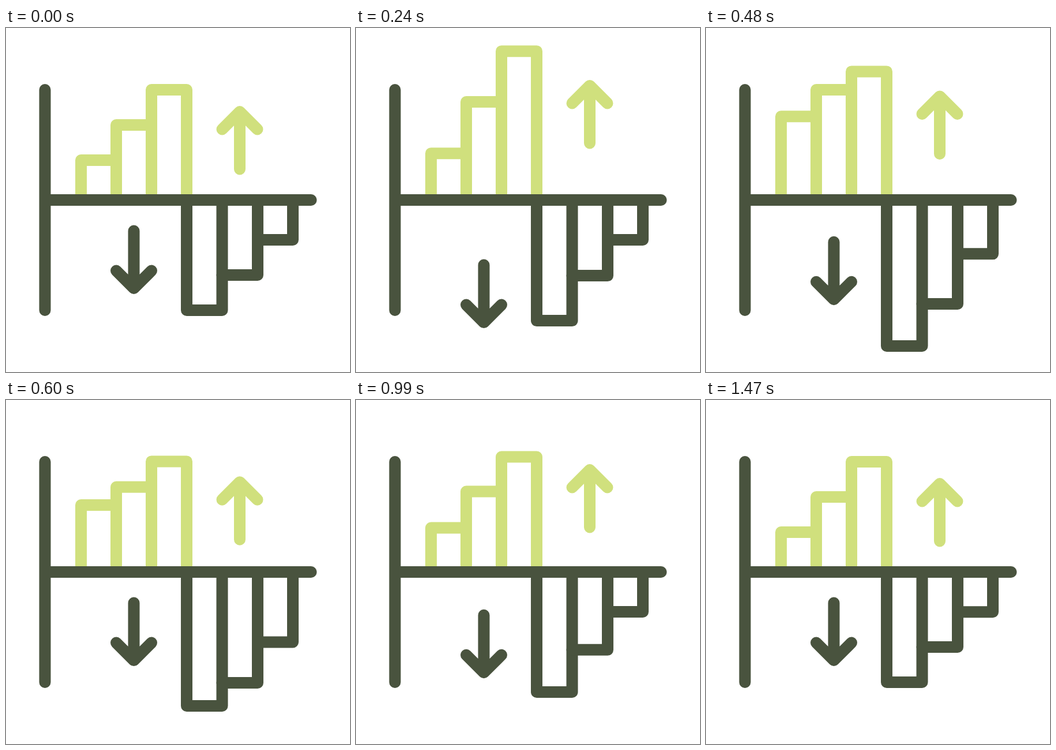
These frames come from a looping animation (596x596 px, 1.5 s). An HTML page:

```html
<!DOCTYPE html>
<html lang="en">
<head>
<meta charset="utf-8">
<title>Rising and falling bars</title>
<style>
  html, body { margin: 0; width: 100%; height: 100%; overflow: hidden; background: #fff; }
  svg { display: block; width: 100%; height: 100%; }
  path { fill: none; stroke-width: 20; stroke-linecap: round; stroke-linejoin: round; }
  .up { stroke: #d0e07d; }
  .down { stroke: #49533e; }
</style>
</head>
<body>
<svg viewBox="0 0 596 596">
  <g id="moving"></g>
  <path class="down" d="M67.5 107V489M67.5 298H528.5"/>
</svg>
<script>
const LOOP = 1500, STEP = 30;
const moving = document.getElementById('moving');

// Two eased bounces: keys are start, first peak, rest, second peak, end.
function bounce(t, keys, first, second) {
  const levels = [0, first, 0, second, 0];
  if (t <= keys[0] || t >= keys[4]) return 0;
  const i = keys.findIndex(k => k > t) - 1;
  const p = (t - keys[i]) / (keys[i + 1] - keys[i]);
  return levels[i] + (levels[i + 1] - levels[i]) * (1 - Math.cos(Math.PI * p)) / 2;
}

const RISE = [0, 310, 617, 925, 1180];
const FALL = [100, 485, 775, 1040, 1278];
const ARROW_UP = [0, 315, 650, 942, 1210];
const ARROW_DOWN = [0, 292, 590, 895, 1170];

const parts = [
  { cls: 'up', keys: RISE, delay: 160, amps: [-76, -9.5], draw: y => `M130 298V${229 + y}H191` },
  { cls: 'up', keys: RISE, delay: 80, amps: [-76, -9.5], draw: y => `M191 298V${168 + y}H252` },
  { cls: 'up', keys: RISE, delay: 0, amps: [-76, -10], draw: y => `M252 298V${107 + y}H313V298` },
  { cls: 'down', keys: FALL, delay: 0, amps: [62, 18.5], draw: y => `M313 298V${489 + y}H374.5V298` },
  { cls: 'down', keys: FALL, delay: 107, amps: [62, 13.5], draw: y => `M374.5 ${428 + y}H436V298` },
  { cls: 'down', keys: FALL, delay: 214, amps: [62, 7.2], draw: y => `M436 ${367 + y}H497V298` },
  { cls: 'up', keys: ARROW_UP, delay: 0, amps: [-52, -26],
    draw: y => `M405 ${244.5 + y}V${145 + y}M374.5 ${175.5 + y}l30.5 -30.5l30.5 30.5` },
  { cls: 'down', keys: ARROW_DOWN, delay: 0, amps: [64, 29],
    draw: y => `M221.5 ${351.5 + y}V${451 + y}M191 ${420.5 + y}l30.5 30.5l30.5 -30.5` }
];

for (const part of parts) {
  part.path = document.createElementNS('http://www.w3.org/2000/svg', 'path');
  part.path.setAttribute('class', part.cls);
  moving.append(part.path);
}

function render(now) {
  const t = Math.floor(now % LOOP / STEP) * STEP;
  for (const { path, keys, delay, amps, draw } of parts) {
    path.setAttribute('d', draw(bounce(t - delay, keys, ...amps)));
  }
}

const start = performance.now();
function tick() {
  render(performance.now() - start);
  requestAnimationFrame(tick);
}
tick();
</script>
</body>
</html>
```
